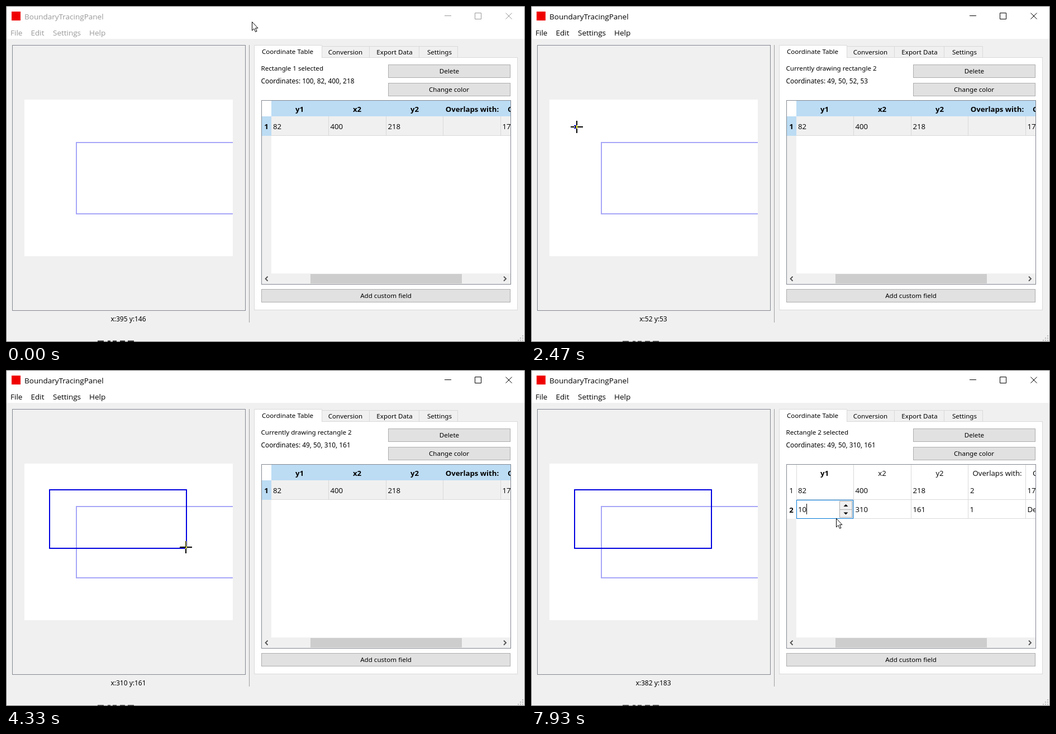
These frames come from a looping animation (929x603 px, 8 s). An HTML page:

```html
<!DOCTYPE html>
<html lang="en">
<head>
<meta charset="utf-8">
<title>Drawing rectangles</title>
<style>
  html, body { margin: 0; width: 100%; height: 100%; overflow: hidden; background: #f0f0f0; }
  svg { display: block; width: 100vw; height: 100vh; }
  rect, line { shape-rendering: crispEdges; }
  text { font: 11.6px "Noto Sans", sans-serif; fill: #000; white-space: pre; }
  .mid { text-anchor: middle; }
  .chrome text { font: 13.5px "Open Sans", sans-serif; }
  .chrome path { fill: none; stroke: #000; }
  .inactive .chrome text { fill: #999; }
  .inactive .chrome path { stroke: #999; }
  .button { fill: #e1e1e1; stroke: #adadad; }
  .tab { fill: #f0f0f0; stroke: #d9d9d9; }
  .frame { fill: none; stroke: #828790; }
  .table text { font: 13.2px "Open Sans", sans-serif; }
  .table .strong, .row1 .head, .row2 .head, .row1 .num1, .num2 { font-weight: 700 !important; }
  .headfill, .fill1, .fill2, .numfill1, .numfill2, .cellfill { fill: #fff; }
  .row1 .headfill, .row1 .numfill1, .row2 .numfill2 { fill: #bcdcf4; }
  .row1 .fill1, .row2 .fill2, .cell .cellfill { fill: #f0f0f0; }
  .grid { stroke: #d9d9d9; }
  .row1 .headgrid { display: none; }
  .row1 .second, .editor { display: none; }
  .edit .editor { display: inline; }
  .edit .plain { display: none; }
  .box { fill: none; stroke-width: 2; }
  #cross { mix-blend-mode: difference; }
</style>
</head>
<body>
<svg id="app" viewBox="0 0 929 603">
  <defs>
    <clipPath id="sheet"><path d="M458 170H903V499H458Z"/></clipPath>
    <clipPath id="image"><path d="M33 168H406V449H33Z"/></clipPath>
  </defs>
  <rect width="929" height="603" fill="#f0f0f0"/>
  <rect width="929" height="59" fill="#fff"/>

  <g class="chrome">
    <rect x="10" y="10" width="16" height="16" fill="#f00000"/>
    <text x="33" y="23.5">BoundaryTracingPanel</text>
    <g id="menu">
      <text x="8" y="53.3">File</text><text x="44.5" y="53.3">Edit</text>
      <text x="84" y="53.3">Settings</text><text x="149" y="53.3">Help</text>
    </g>
    <path d="M785 17.5H797M839.5 12.5H850.5V23.5H839.5Z"/>
    <path d="M894.5 12.5L905.5 23.5M905.5 12.5L894.5 23.5"/>
  </g>

  <rect class="frame" x="11.5" y="70.5" width="417" height="476"/>
  <rect x="33" y="168" width="373" height="281" fill="#fff"/>
  <g clip-path="url(#image)">
    <rect class="box" x="126" y="245" width="300" height="128" stroke="#a6a6f8"/>
    <rect class="box" id="drawn" x="78" y="215" stroke="#0000e0"/>
  </g>
  <text class="mid" id="pointer" x="219" y="565.5" style="font-size:12px"></text>
  <line x1="435.5" x2="435.5" y1="70" y2="568" stroke="#a0a0a0"/>

  <rect x="444.5" y="92.5" width="471" height="453" fill="#fff" stroke="#d9d9d9"/>
  <rect class="tab" x="565.5" y="72.5" width="85" height="20"/>
  <rect class="tab" x="650.5" y="72.5" width="89" height="20"/>
  <rect class="tab" x="739.5" y="72.5" width="69" height="20"/>
  <path d="M444.5 93V70.5H565.5V93" fill="#fff" stroke="#d9d9d9"/>
  <text class="mid" x="504" y="86.3">Coordinate Table</text>
  <text class="mid" x="607.5" y="87.3">Conversion</text>
  <text class="mid" x="695.5" y="87.3">Export Data</text>
  <text class="mid" x="776" y="87.3">Settings</text>

  <text id="status" x="456.5" y="116.3"></text>
  <text id="coords" x="456.5" y="138.5" style="font-size:11.85px"></text>
  <rect class="button" x="684.5" y="105.5" width="218" height="23"/>
  <rect class="button" x="684.5" y="138.5" width="218" height="23"/>
  <rect class="button" x="457.5" y="508.5" width="445" height="23"/>
  <text class="mid" x="793.5" y="121.3">Delete</text>
  <text class="mid" x="793" y="154.3">Change color</text>
  <text class="mid" x="680" y="524.3">Add custom field</text>

  <g class="table" clip-path="url(#sheet)">
    <rect x="458" y="170" width="445" height="329" fill="#fff"/>
    <rect class="headfill" x="475" y="170" width="428" height="28"/>
    <rect x="458" y="198" width="17" height="282" fill="#f0f0f0"/>
    <rect class="fill1" x="475" y="198" width="428" height="34"/>
    <rect class="numfill1" x="458" y="198" width="17" height="35"/>
    <g class="second">
      <rect class="fill2" x="475" y="233" width="428" height="34"/>
      <rect class="cellfill" x="475" y="233" width="102" height="34" style="fill-opacity:var(--cell,0)"/>
      <rect class="numfill2" x="458" y="233" width="17" height="34"/>
    </g>
    <g id="cells"></g>
    <g class="editor">
      <rect x="475.5" y="233.5" width="101" height="33" fill="#fff" stroke="#0078d7"/>
      <rect class="button" x="552.5" y="235.5" width="22" height="15" style="fill:#f0f0f0"/>
      <rect class="button" x="552.5" y="250.5" width="22" height="14" style="fill:#f0f0f0"/>
      <rect id="hover" x="552.5" y="250.5" width="22" height="14" fill="#e5f1fb" stroke="#7ebcec"/>
      <path d="M559.5 245H567.5L563.5 241ZM559.5 255.5H567.5L563.5 259.5Z"/>
      <rect id="selection" x="478" y="240" width="15" height="19" fill="#0078d7"/>
      <text id="typed" x="478" y="255.2"></text>
      <rect id="caret" y="240" width="1" height="19"/>
    </g>
    <rect x="458" y="480" width="445" height="19" fill="#f0f0f0"/>
    <rect x="545" y="481" width="271" height="17" fill="#cdcdcd"/>
    <path d="M468.5 485.5L464.5 489.5L468.5 493.5M891 485.5L895 489.5L891 493.5" fill="none" stroke="#505050" stroke-width="1.8"/>
  </g>
  <rect class="frame" x="457.5" y="169.5" width="446" height="330"/>

  <path d="M924 591h2v2h-2zM920 595h2v2h-2zM924 595h2v2h-2zM916 599h2v2h-2zM920 599h2v2h-2zM924 599h2v2h-2z" fill="#bcbcbc"/>
  <rect x=".5" y=".5" width="928" height="602" fill="none" stroke="#6a6a6a"/>
  <path id="below" d="M164 602H232" stroke="#222" stroke-dasharray="11 7 5 4 7 6 9 5"/>

  <path id="cross" d="M-11 0H11M0 -11V11" stroke="#fff" stroke-width="2" shape-rendering="crispEdges"/>
  <path id="arrow" d="M.5 .5V16L4 12.7L6.6 18.4L9 17.3L6.5 11.7H11Z" fill="#fff" stroke="#000"/>
</svg>
<script>
const LOOP = 8000, STEP = 1000 / 15;
const $ = id => document.getElementById(id);
const app = $('app');

// Pointer path: time, x, y
const path = [
  [0, 440, 28], [267, 440, 28], [467, 290, 185], [667, 108, 290], [933, 395, 230],
  [1000, 395, 230], [1400, 299, 171], [1867, 71, 215], [2000, 71, 215], [2133, 78, 215],
  [2200, 78, 215], [2333, 79, 215], [2400, 79, 215], [3200, 234, 319], [3267, 239, 319],
  [4133, 320, 318], [4200, 320, 318], [4333, 322, 318], [4867, 322, 318], [5000, 388, 338],
  [5400, 711, 270], [5600, 742, 234], [5733, 738, 224], [5767, 738, 224], [6400, 553, 252],
  [6700, 553, 252], [7467, 546, 266], [LOOP, 546, 266]
];

const slope = (i, axis) => (path[i + 1][axis] - path[i][axis]) / (path[i + 1][0] - path[i][0]);

// Monotone tangent, so rests stay still and turns do not overshoot
function tangent(i, axis) {
  if (i === 0 || i === path.length - 1) return 0;
  const a = slope(i - 1, axis), b = slope(i, axis);
  return a * b > 0 ? 2 * a * b / (a + b) : 0;
}

function pointerAt(t) {
  let i = 0;
  while (i < path.length - 2 && t >= path[i + 1][0]) i++;
  const span = path[i + 1][0] - path[i][0], u = (t - path[i][0]) / span;
  return [1, 2].map(axis => {
    const from = path[i][axis], to = path[i + 1][axis], ease = u * u * (3 - 2 * u);
    return from + (to - from) * ease +
      span * u * (1 - u) * ((1 - u) * tangent(i, axis) - u * tangent(i + 1, axis));
  });
}

const overImage = ([x, y]) => x >= 33 && x <= 406 && y >= 168 && y <= 449;
const toImage = ([x, y]) => [Math.round((x - 33) / 0.9325), Math.round((y - 168) / 0.9325)];

function imagePoint(t) {
  if (t >= 5000) return [382, 183];
  if (t >= 4320) return [310, 161];
  const lagged = pointerAt(t > 1000 && t < 1900 ? t - 33 : t);
  return overImage(lagged) ? toImage(lagged) : [395, 146];
}

function buildCells() {
  const text = (cls, x, y, value) => `<text class="${cls}" x="${x}" y="${y}">${value}</text>`;
  const edges = [475, 577, 680, 782, 885];
  const rows = [['82', '400', '218', '', '17'], ['50', '310', '161', '1', 'De']];
  let out = '';
  edges.forEach((x, i) => {
    const line = (cls, y1, y2) => `<line class="grid ${cls}" x1="${x + .5}" x2="${x + .5}" y1="${y1}" y2="${y2}"/>`;
    out += line('headgrid', 170, 198);
    if (i) out += line('', 198, 233) + line('second', 233, 267);
    else out += line('second', 198, 267);
    rows.forEach((row, r) => {
      const cls = r ? (i ? 'second' : 'second plain') : '';
      out += text(cls, x + (i ? 3.5 : 3), r ? 255.2 : 220.7, row[i]);
    });
  });
  out += text('second', 786, 220.7, '2');
  ['y1', 'x2', 'y2', 'Overlaps with:'].forEach((name, i) => {
    out += text(i ? 'head mid' : 'strong mid', [525.5, 628.5, 731.5, 834.5][i], 189.6, name);
  });
  out += text('head', 898, 189.6, 'C');
  out += text('num1 mid', 466, 221.2, '1') + text('num2 second mid', 466, 255.7, '2');
  out += '<line class="grid" x1="475" x2="903" y1="232.5" y2="232.5"/>';
  out += '<line class="grid second" x1="475" x2="903" y1="266.5" y2="266.5"/>';
  $('cells').innerHTML = out;
}

function place(id, [x, y], visible) {
  $(id).setAttribute('transform', `translate(${Math.round(x)} ${Math.round(y)})`);
  $(id).style.display = visible ? '' : 'none';
}

function renderEditor(t) {
  const selected = t < 7520;
  $('selection').style.display = selected ? '' : 'none';
  $('typed').textContent = selected ? '50' : t < 7860 ? '' : t < 7925 ? '1' : '10';
  $('typed').style.fill = selected ? '#fff' : '#000';
  $('caret').style.display = t < 7720 ? 'none' : '';
  $('caret').setAttribute('x', t < 7860 ? 479 : t < 7925 ? 486 : 493);
  $('hover').style.opacity = Math.max(0, Math.min(1, (t - 6700) / 250, (7520 - t) / 250));
}

function render(t) {
  const drawing = t >= 2460, stored = t >= 4520;
  const stage = !stored ? 'row1' : t < 6390 ? 'row2' : t < 6660 ? 'cell' : 'cell edit';
  app.setAttribute('class', stage + (drawing ? '' : ' inactive'));
  app.style.setProperty('--cell', stage === 'cell' ? 1 : 0);

  const point = pointerAt(t), inside = overImage(point), [px, py] = imagePoint(t);
  place('cross', point, inside);
  place('arrow', point, !inside);
  $('pointer').textContent = `x:${px} y:${py}`;

  const [x2, y2] = t >= 4320 ? [310, 161] : [px, py];
  $('drawn').style.display = drawing ? '' : 'none';
  if (drawing) {
    $('drawn').setAttribute('width', Math.max(0, Math.round(33.9 + x2 * 0.9325) - 78));
    $('drawn').setAttribute('height', Math.max(0, Math.round(169.6 + y2 * 0.9325) - 215));
  }
  $('status').textContent = stored ? 'Rectangle 2 selected'
    : drawing ? 'Currently drawing rectangle 2' : 'Rectangle 1 selected';
  $('coords').textContent = 'Coordinates: ' + (drawing ? `49, 50, ${x2}, ${y2}` : '100, 82, 400, 218');
  $('below').setAttribute('stroke-width', drawing ? 1.5 : 3);
  renderEditor(t);
}

const start = performance.now();
function tick() {
  const t = (performance.now() - start) % LOOP;
  render(Math.floor((t + 4) / STEP) * STEP % LOOP);
  requestAnimationFrame(tick);
}
buildCells();
tick();
</script>
</body>
</html>
```
